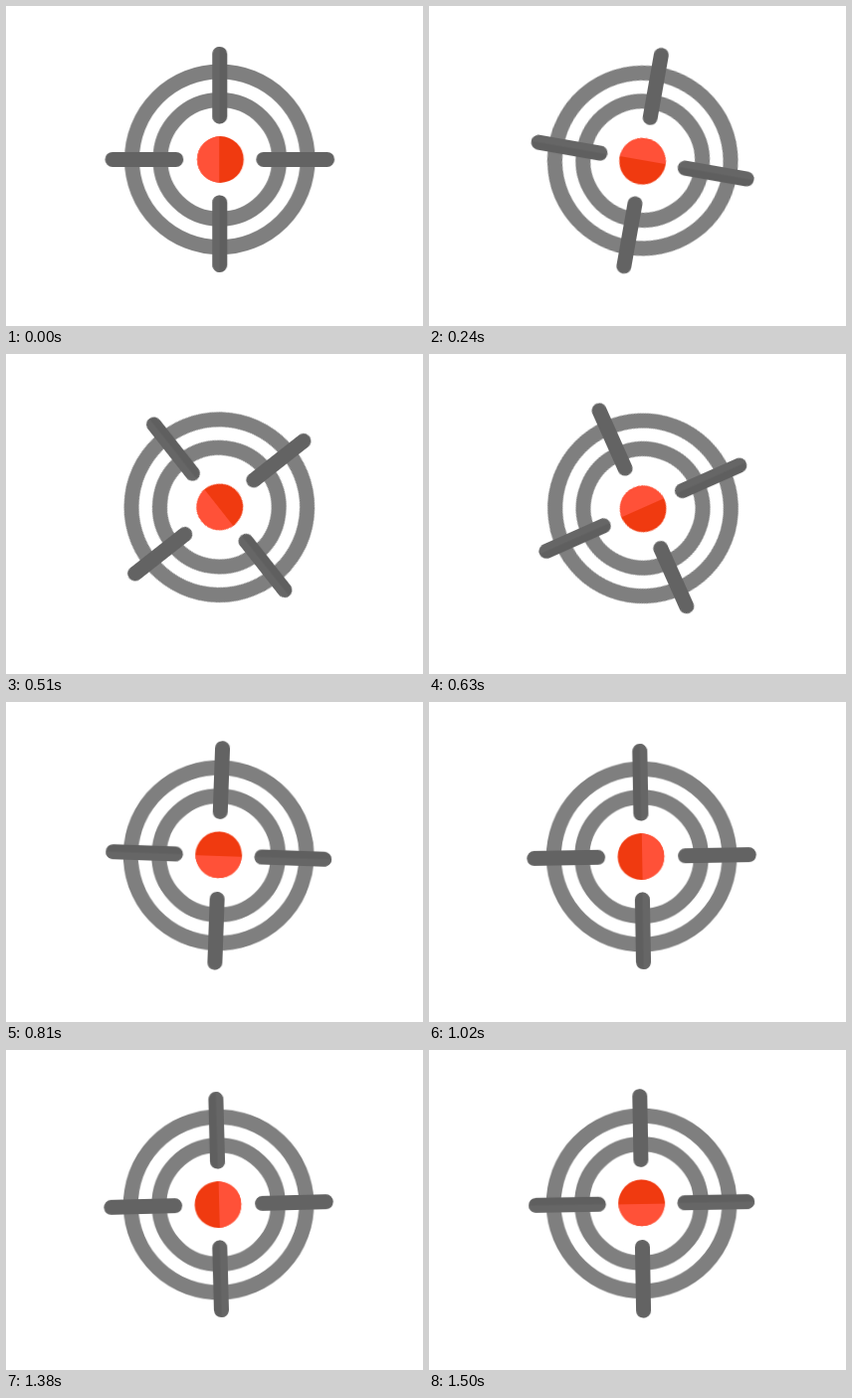
Write an HTML page that moves like this. It is 419x322 px and loops after 1.8 s.

```html
<!DOCTYPE html>
<html lang="en">
<head>
<meta charset="utf-8">
<title>Spinning crosshair</title>
<style>
  html, body { margin: 0; width: 100%; height: 100%; overflow: hidden; background: #fff; }
  svg { display: block; width: 419px; height: 322px; }
  .ring { fill: none; stroke: #7f7f7f; stroke-width: 15; }
  .bar { stroke: #636363; stroke-width: 15; stroke-linecap: round; }
</style>
</head>
<body>
<svg viewBox="0 0 419 322">
  <defs>
    <clipPath id="left"><rect x="-120" y="-120" width="120" height="240"/></clipPath>
  </defs>
  <g transform="translate(214.2 155)">
    <g id="sight">
      <g transform="translate(.6 -.6)">
        <circle class="ring" r="88.3"/>
        <circle class="ring" r="59.8"/>
        <path class="bar" d="M-107.8 0H-44M44 0H107.8"/>
        <path class="bar" style="stroke:#5f5f5f" d="M0-106V-43.5M0 43.5V106"/>
        <path class="bar" style="stroke:#666" clip-path="url(#left)" d="M0-106V-43.5M0 43.5V106"/>
      </g>
      <circle cx="1.2" cy="-.5" r="23.4" fill="#f03a10"/>
      <circle cx="1.2" cy="-.5" r="23.4" fill="#ff5138" clip-path="url(#left)"/>
    </g>
  </g>
</svg>
<script>
  const LOOP = 1800, STEP = 30, LAST = 50;

  // [step, degrees, degrees per step]
  const spin = [
    [0, 0, 5], [8, 100, 19], [13, 225.5, 25], [21, 426, 29],
    [34, 899, 36], [42, 1154, 28], [50, 1349, 21]
  ];

  // Cubic Hermite curve through the spin table
  function angle(n) {
    const i = Math.max(1, spin.findIndex(p => p[0] >= n));
    const [n0, a0, v0] = spin[i - 1], [n1, a1, v1] = spin[i];
    const d = n1 - n0, u = (n - n0) / d, w = 1 - u;
    return w * w * ((1 + 2 * u) * a0 + u * d * v0)
         + u * u * ((1 + 2 * w) * a1 - w * d * v1);
  }

  const key = (n, offset) => ({
    transform: `rotate(${angle(n)}deg)`, offset, easing: 'step-end'
  });
  const frames = Array.from({ length: LAST + 1 }, (_, n) => key(n, n * STEP / LOOP));
  frames.push(key(LAST, 1));

  document.getElementById('sight').animate(frames, { duration: LOOP, iterations: Infinity });
</script>
</body>
</html>
```
